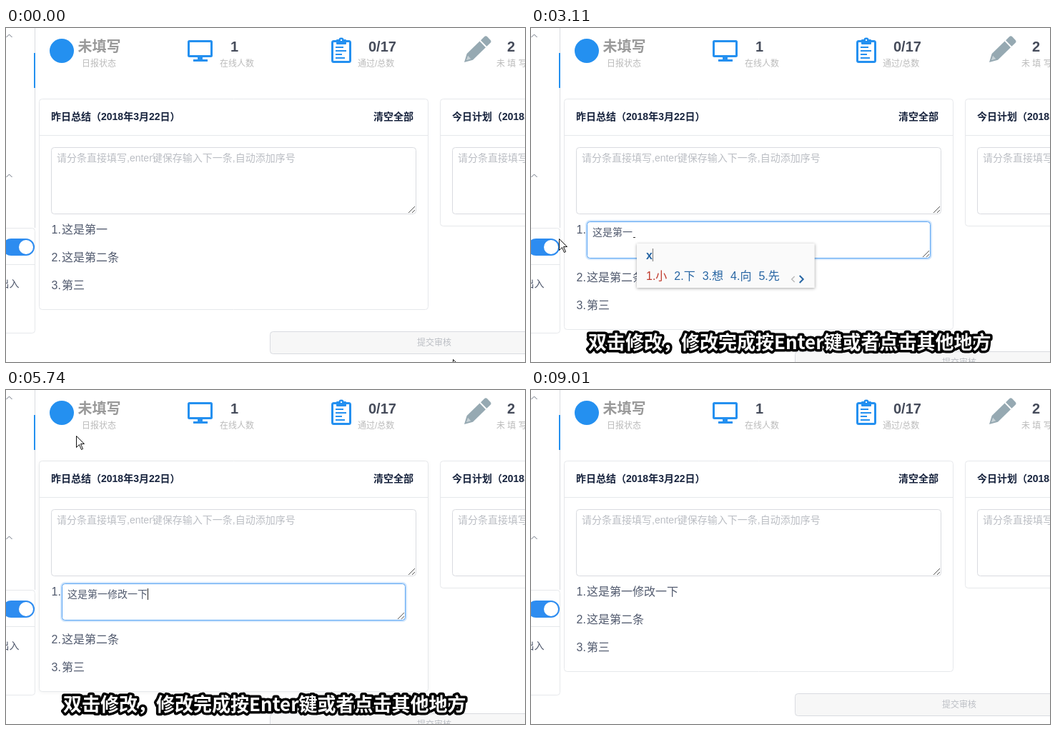
Animation, 726 px wide and 468 px high, one loop 9.08 s. Source, as an HTML page with a canvas:

```html
<!DOCTYPE html>
<html lang="zh-CN">
<head>
<meta charset="utf-8">
<title>日报</title>
<style>
html, body { margin: 0; width: 726px; height: 468px; overflow: hidden; background: #fff; }
canvas { display: block; }
</style>
</head>
<body>
<canvas id="stage" width="726" height="468"></canvas>
<script>
const c = document.getElementById('stage').getContext('2d');
const LOOP = 9080;
const FAMILY = '"Liberation Sans", "Noto Sans CJK SC", "Noto Sans CJK", sans-serif';
const CAPTION_FONT = 'bold 26px "Noto Sans CJK SC", "Noto Sans CJK", sans-serif';
const BLUE = '#2490f0', LINE = '#e6e8eb', FIELD = '#d9dbe0', INK = '#515a6e', DARK = '#17233d';
const HINT = '请分条直接填写,enter键保存输入下一条,自动添加序号';

// Input method: start time, typed letters, candidates
const TYPING = [
  [3110, 'x', '小 下 想 向 先'],
  [3180, 'xi', '系 洗 西 喜 吸'],
  [3260, 'xiu', '修 秀 休 袖 绣'],
  [3340, "xiu'g", '修改 修个 修 秀 休'],
  [3420, "xiu'ga", '修改 修盖 修 秀 休'],
  [3500, "xiu'gai", '修改 修盖 修 秀 休'],
  [3760, '', ''],
  [4040, 'y', '一 有 也 要 与'],
  [4120, 'yi', '一 以 已 亿 意'],
  [4190, "yi'x", '一下 以下 一些 一项 一线'],
  [4270, "yi'xi", '一系 一西 一席 依稀 衣洗'],
  [4350, "yi'xia", '一下 以下 一夏 依下 已下'],
  [4520, '', '']
];

function steps(t, a, b, n) {
  if (t < a) return 0;
  if (t >= b) return 1;
  return (Math.floor((t - a) / (b - a) * (n - 1)) + 1) / n;
}
const between = (t, a, b) => t >= a && t < b;
const inside = (p, x, y, r, b) => p[0] >= x && p[0] < r && p[1] >= y && p[1] < b;

// start, end, steps, x, y
const PATH = [
  [70, 530, 7, 180, 284], [680, 680, 1, 178, 280], [760, 760, 1, 176, 277],
  [1540, 1540, 1, 175, 284], [2170, 2480, 5, 43, 310], [3110, 3500, 6, 20, 222],
  [4040, 4350, 5, 20, -30], [5510, 6210, 10, 280, 284], [7520, 8300, 11, 650, 431],
  [9010, 9010, 1, 650, 500]
];
function pointer(t) {
  let x = 625, y = 464;
  for (const [a, b, n, tx, ty] of PATH) {
    const k = steps(t, a, b, n);
    x += (tx - x) * k;
    y += (ty - y) * k;
  }
  return [Math.round(x), Math.round(y)];
}

function text(s, x, y, size, color, bold) {
  c.font = (bold ? 'bold ' : '') + size + 'px ' + FAMILY;
  c.fillStyle = color;
  c.fillText(s, x, y);
  return c.measureText(s).width;
}
function rect(x, y, w, h, color) {
  c.fillStyle = color;
  c.fillRect(x, y, w, h);
}
function box(x, y, w, h, r, stroke, fill, width = 1) {
  c.beginPath();
  c.roundRect(x, y, w, h, r);
  if (fill) { c.fillStyle = fill; c.fill(); }
  if (stroke) { c.strokeStyle = stroke; c.lineWidth = width; c.stroke(); }
}
function shape(points, fill, stroke, width = 1, open) {
  c.beginPath();
  points.forEach(([x, y]) => c.lineTo(x, y));
  if (!open) c.closePath();
  if (fill) { c.fillStyle = fill; c.fill(); }
  if (stroke) { c.strokeStyle = stroke; c.lineWidth = width; c.stroke(); }
}
function at(x, y, draw) {
  c.save();
  c.translate(x, y);
  draw();
  c.restore();
}
function shadow(color, blur, dy) {
  c.shadowColor = color;
  c.shadowBlur = blur;
  c.shadowOffsetY = dy;
}
function grip(x, y) {
  shape([[x - 9, y], [x, y - 9]], null, '#555', 1, true);
  shape([[x - 4, y], [x, y - 4]], null, '#555', 1, true);
}

function sidebar(p) {
  if (inside(p, 0, 182, 40, 231)) rect(0, 182, 40, 49, '#f3f3f3');
  if (p[0] < 40 && p[1] < 35) rect(0, 0, 40, 35, '#f3f3f3');
  rect(40, 0, 1, 280, FIELD);
  rect(39, 35, 2, 49, BLUE);
  for (const y of [13, 209]) shape([[0.5, y], [4.5, y - 4], [8.5, y]], null, '#6b7280', 1, true);
  box(-20.5, 280.5, 61, 147, 4, LINE);
  rect(0, 331, 40, 1, LINE);
  box(-5, 295, 45, 24, 12, null, '#2d8cf0');
  box(18, 297, 20, 20, 10, null, '#fff');
  text('出入', -9.5, 363, 14, INK);
}

function stats() {
  c.beginPath();
  c.arc(78, 32, 17, 0, 7);
  c.fillStyle = BLUE;
  c.fill();
  text('未填写', 100.5, 33, 20, '#999', true);
  text('日报状态', 106, 54, 12, '#bbb');

  box(255.5, 18.5, 32, 21, 1, BLUE, null, 3);
  rect(268, 41, 7, 4, BLUE);
  rect(262, 44, 20, 3, BLUE);
  text('1', 314, 33, 20, '#464c5b', true);
  text('在线人数', 299, 54, 12, '#bbb');

  box(456.5, 18.5, 25, 29, 2, BLUE, null, 3);
  box(462, 16, 14, 7, 1, null, BLUE);
  box(465.5, 13.5, 7, 6, 3, null, BLUE);
  rect(468, 16, 2, 2, '#fff');
  [[27, 11], [32, 15], [37, 9], [42, 13]].forEach(([y, w]) => rect(461, y - 1, w, 2, BLUE));
  text('0/17', 507, 33, 20, '#464c5b', true);
  text('通过/总数', 492, 54, 12, '#bbb');

  at(641, 48, () => {
    c.rotate(-0.772);
    shape([[0, 0], [11, -6], [36, -6], [36, 6], [11, 6]], '#96a9b2');
    shape([[4, 0], [10, -3], [10, 3]], '#c6d1d6');
    box(38, -6, 10, 12, [0, 3, 3, 0], null, '#96a9b2');
  });
  text('2', 701, 33, 20, '#464c5b', true);
  text('未 填 写', 686, 54, 12, '#bbb');
}

function card(x, w, bottom, title, lift) {
  c.save();
  if (lift > 0) shadow(`rgba(0,0,0,${0.24 * lift})`, 6, 1);
  box(x + 0.5, 99.5, w, bottom - 99, 4, null, '#fff');
  c.restore();
  box(x + 0.5, 99.5, w, bottom - 99, 4, LINE);
  rect(x + 1, 150, w - 1, 1, LINE);
  text(title, x + 17, 129, 14, DARK, true);
  box(x + 17.5, 167.5, w - 34, 93, 4, FIELD, '#fff');
  text(HINT, x + 25, 187, 14, '#bbbec4');
  grip(x + w - 18, 259);
}

function trash(y) {
  rect(564, y + 1, 10, 2, INK);
  rect(567, y, 4, 1, INK);
  box(565, y + 4, 8, 8, [0, 0, 1, 1], null, INK);
}

function editor(t, words, typing) {
  const focus = steps(t, 1710, 1860, 3);
  if (focus) box(77.5, 270.5, 482, 53, 5, `rgba(45,140,240,${0.22 * focus})`, null, 3);
  box(78.5, 271.5, 480, 51, 4, focus ? '#57a3f3' : FIELD, '#fff');
  grip(557, 321);
  const end = 86 + text(words, 86, 291, 14, INK);
  if (typing) {
    rect(end + 1, 293, 3, 1, '#333');
    return end;
  }
  const caret = between(t, 1710, 2640) || between(t, 3760, 4040) || between(t, 4580, 5130) ||
    between(t, 5680, 6210) || t >= 6670;
  if (caret) rect(Math.round(end), 278, 1, 16, '#222');
  return end;
}

function candidates(end, letters, list) {
  const x = Math.round(end) + 6;
  const words = list.split(' ').map((w, i) => `${i + 1}.${w}`);
  c.font = '16px ' + FAMILY;
  const width = words.reduce((sum, w) => sum + c.measureText(w).width + 10, 0) + 52;
  c.save();
  shadow('rgba(0,0,0,.35)', 4, 1);
  rect(x, 302, width, 62, '#fafafa');
  c.restore();
  const edge = x + 13 + text(letters, x + 13, 324, 16, '#2765a3', true);
  rect(Math.round(edge), 309, 1, 18, '#777');
  let left = x + 13;
  words.forEach((w, i) => {
    left += text(w, left, 353, 16, i ? '#2765a3' : '#c0392b') + 10;
  });
  shape([[left + 11, 348], [left + 7, 352], [left + 11, 356]], null, '#bbb', 1.5, true);
  shape([[left + 18, 347], [left + 23, 352], [left + 18, 357]], null, '#2765a3', 2, true);
}

function cursor(p, editing) {
  const [x, y] = p;
  const typing = inside(p, 63, 167, 574, 261) || (editing && inside(p, 78, 271, 559, 323));
  at(x + 0.5, y + 0.5, () => {
    if (typing) {
      shape([[-3, -8], [-1, -8], [0, -7], [1, -8], [3, -8]], null, '#000', 1, true);
      shape([[0, -7], [0, 7]], null, '#000', 1, true);
      shape([[-3, 8], [-1, 8], [0, 7], [1, 8], [3, 8]], null, '#000', 1, true);
    } else if (x < 40 && y < 231) {
      shape([[-2, 1], [0, -1], [2, 1], [2, 7], [5, 7], [6, 8], [9, 8], [10, 9], [12, 10], [13, 12],
        [13, 16], [10, 21], [10, 22], [0, 22], [-1, 20], [-6, 13], [-6, 11], [-4, 10], [-2, 12]],
      '#fff', '#111', 1.2);
      for (const k of [3, 6, 9]) rect(k, 8, 1, 4, '#333');
    } else {
      shape([[0, 0], [0, 16], [4, 12], [7, 19], [9, 18], [6, 11], [11, 11]], '#fff', '#111');
    }
  });
}

function caption() {
  const s = '双击修改，修改完成按Enter键或者点击其他地方';
  c.font = CAPTION_FONT;
  c.lineJoin = 'round';
  c.lineWidth = 7;
  c.strokeStyle = '#000';
  c.strokeText(s, 80, 450);
  c.fillStyle = '#fff';
  c.fillText(s, 80, 450);
  c.lineJoin = 'miter';
}

function draw(t) {
  const editing = between(t, 1540, 7060);
  const drop = editing ? 28 : 0;
  const p = pointer(t);
  const lift = steps(t, 300, 530, 3) - steps(t, 2400, 2640, 4) +
    steps(t, 5680, 5920, 4) - steps(t, 8100, 8300, 3);
  const words = '这是第一' + (t >= 3760 ? '修改' : '') + (t >= 4520 ? '一下' : '');
  const key = TYPING.filter(k => t >= k[0]).pop();
  const typing = key && key[1];

  rect(0, 0, 726, 468, '#fff');
  sidebar(p);
  stats();
  card(607, 544, 277, '今日计划（2018年3月23日）', 0);
  card(46, 544, 394 + drop, '昨日总结（2018年3月22日）', lift);
  text('清空全部', 514, 129, 14, DARK, true);

  box(369.5, 425.5 + drop, 460, 31, 4, FIELD, '#f7f7f7');
  text('提交审核', 575, 445 + drop, 12, '#bbbec4');

  text('1.', 63.5, 288, 16, INK);
  text('2.', 63.5, 327 + drop, 16, INK);
  text('3.', 63.5, 366 + drop, 16, INK);
  text('这是第二条', 78, 327 + drop, 16, INK);
  text('第三', 78, 366 + drop, 16, INK);

  const tops = [264, 302 + drop, 341 + drop, 380 + drop];
  if (t < 1540 || t > 5000) {
    for (let i = 0; i < 3; i++) {
      if (inside(p, 63, tops[i], 575, tops[i + 1])) trash(i ? tops[i] + 13 : 276);
    }
  }

  if (editing) {
    const end = editor(t, words, typing);
    if (typing) candidates(end, key[1], key[2]);
  } else {
    text(words, 78, 288, 16, INK);
  }

  cursor(p, editing);
  if (between(t, 70, 9010)) caption();
}

const start = performance.now();
function frame(now) {
  draw(Math.max(0, now - start) % LOOP);
  requestAnimationFrame(frame);
}
draw(0);
requestAnimationFrame(frame);
</script>
</body>
</html>
```
